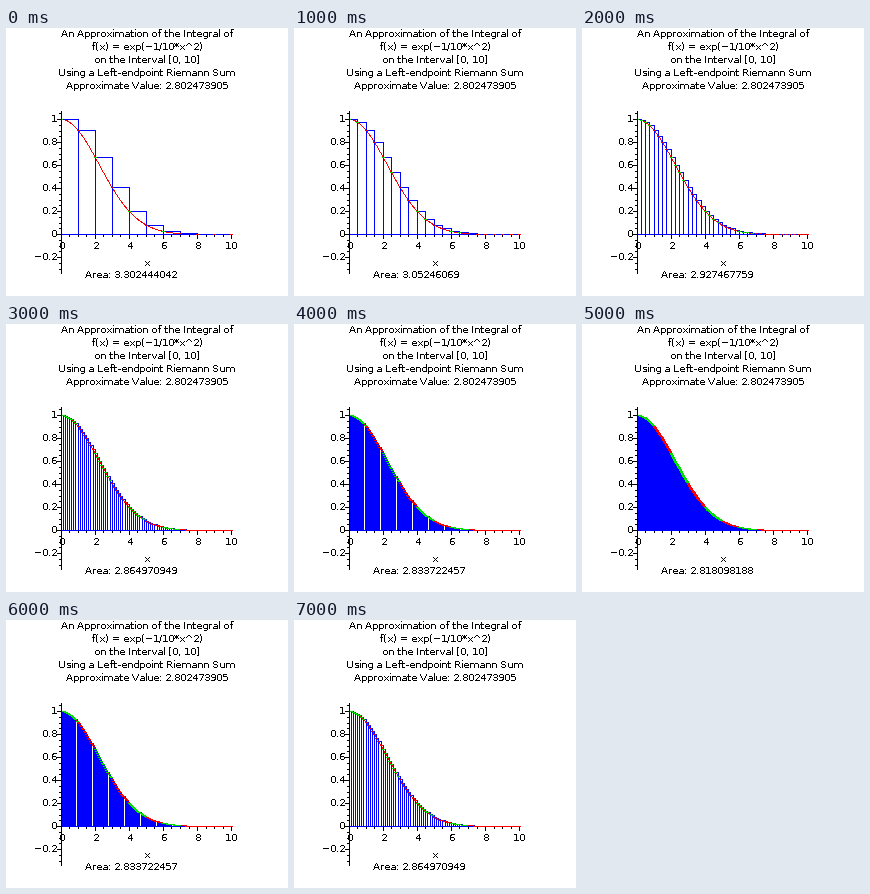
A matplotlib script for the animation above (8000 ms loop, 282 by 268 pixels).

```python
import numpy as np
import matplotlib.pyplot as plt
from matplotlib.animation import FuncAnimation
from matplotlib.collections import PolyCollection

W, H = 282, 268
plt.rcParams.update({
    "font.family": "DejaVu Sans",
    "font.size": 10,
    "text.hinting": "native",
    "text.hinting_factor": 1,
    "text.antialiased": False,
})
BLUE, RED, GREEN = "#0000ff", "#ff0000", "#00e000"
COUNTS = [10, 20, 40, 80, 160, 320, 160, 80]
MINUS = "\u2212"

fig = plt.figure(figsize=(W / 72, H / 72), dpi=72, facecolor="white")
ax = fig.add_axes([0, 0, 1, 1])
ax.set(xlim=(0, W), ylim=(H, 0))
ax.axis("off")


def f(x):
    return np.exp(-x**2 / 10)


def px(x):
    """Pixel column of a horizontal coordinate."""
    return np.floor(55.01 + 512 / 30 * np.asarray(x))


def py(y):
    """Pixel row of a vertical coordinate."""
    return np.floor(206.5 - 115 * np.asarray(y))


def blocks(x0, y0, x1, y1, color, z):
    """Fill whole pixels from (x0, y0) to (x1, y1), ends included."""
    x0, y0, x1, y1 = np.broadcast_arrays(x0, y0, x1, y1)
    xs = np.stack([x0, x1 + 1, x1 + 1, x0], axis=-1)
    ys = np.stack([y0, y0, y1 + 1, y1 + 1], axis=-1)
    quads = np.stack([xs, ys], axis=-1).reshape(-1, 4, 2)
    return ax.add_collection(
        PolyCollection(quads, facecolors=color, edgecolors="none",
                       linewidths=0, antialiaseds=False, zorder=z),
        autolim=False)


def label(x, y, text, ha="center"):
    return ax.text(x, y, text, ha=ha, va="baseline", color="black", zorder=9)


def draw_axes():
    blocks(55, 83, 55, 245, "black", 6)
    blocks(55, 206, 225, 206, "black", 1)
    for k in range(21):
        size = 4 if k % 4 == 0 else 2
        x = px(k / 2)
        blocks(x, 207, x, 206 + size, "black", 6)
    for k in range(-6, 22):
        size = 4 if k % 4 == 0 else 2
        y = py(k / 20)
        blocks(55 - size, y, 54, y, "black", 6)
    for v in range(0, 11, 2):
        label(px(v) + 0.5, 221, str(v))
    for k in range(-1, 6):
        text = f"{abs(k) / 5:g}"
        label(51, py(k / 5) + 3, (MINUS if k < 0 else "") + text, "right")
    label(141, 238, "x")


def draw_title():
    rows = [
        "An Approximation of the Integral of",
        f"f(x) = exp({MINUS}1/10*x^2)",
        "on the Interval [0, 10]",
        "Using a Left-endpoint Riemann Sum",
        "Approximate Value: 2.802473905",
    ]
    for i, row in enumerate(rows):
        label(141, 9 + 13 * i, row)


def draw_curve():
    x = np.linspace(0, 10, 341)
    cols, rows = px(x), py(f(x))
    blocks(cols, rows, cols, rows, RED, 2)


def draw_bars(n):
    edges = np.linspace(0, 10, n + 1)
    left, right = px(edges[:-1]), px(edges[1:])
    top, base = py(f(edges[:-1])), py(0)
    return [
        blocks(left, top, left, base, BLUE, 3),
        blocks(right, top, right, base, BLUE, 3),
        blocks(left, top, right, top, BLUE, 3),
        blocks(left, base, right, base, BLUE, 3),
    ]


def draw_dots(n):
    """Mark the sample points, coloured by alternating unit intervals."""
    x = np.linspace(0, 10, n + 1)
    green = (x % 2 < 1) & (x < 8)
    return [
        blocks(px(s) - 1, py(f(s)), px(s) + 1, py(f(s)), color, 4)
        for s, color in ((x[~green], RED), (x[green], GREEN))
    ]


draw_axes()
draw_title()
draw_curve()
area = label(79, 250, "", "left")
shown = []


def update(i):
    while shown:
        shown.pop().remove()
    n = COUNTS[i]
    total = f(np.arange(n) * 10 / n).sum() * 10 / n
    shown.extend(draw_bars(n) + draw_dots(n))
    area.set_text(f"Area: {total:.10g}")
    return shown + [area]


anim = FuncAnimation(fig, update, frames=len(COUNTS), interval=1000,
                     init_func=lambda: [], repeat=True, repeat_delay=0)
plt.show()
```
